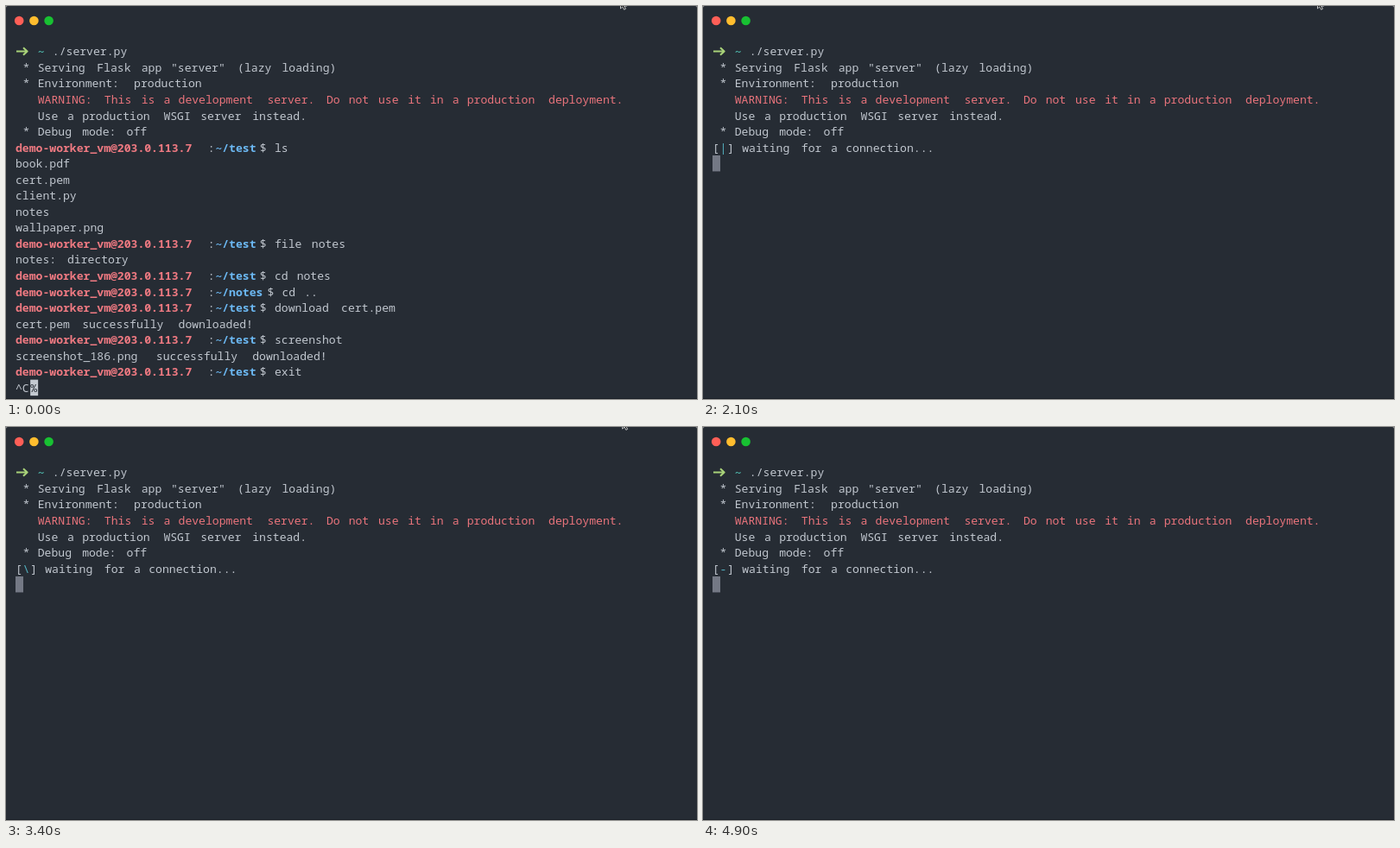
Write an HTML page that moves like this. It is 800 px wide and 455 px high and loops after 5 s.

```html
<!DOCTYPE html>
<html lang="en">
<head>
<meta charset="utf-8">
<title>Terminal session</title>
<style>
  html, body { margin: 0; width: 100%; height: 100%; overflow: hidden; background: #a9adb2; }
  svg { display: block; width: 800px; height: 455px; }
  text { font: 13.1px "Noto Sans Mono", monospace; fill: #c1c7cf; white-space: pre; }
  .warn { fill: #ea747c; }
  .host { fill: #f07a82; font-weight: 700; }
  .path { fill: #6cb9f4; font-weight: 700; }
  .home { fill: #4fb9ad; font-weight: 700; }
  .spin { fill: #55b5c4; }
  .dark { fill: #262c34; }
</style>
</head>
<body>
<svg viewBox="0 0 800 455">
  <rect width="800" height="460" rx="2" fill="#262c34"/>
  <rect y="454" width="800" height="1" fill="#1b2026"/>
  <circle cx="15.2" cy="17" r="5.3" fill="#ff5f57"/>
  <circle cx="32.4" cy="17" r="5.3" fill="#ffbd2e"/>
  <circle cx="49.6" cy="17" r="5.3" fill="#18c132"/>
  <path d="M12 52.5H24M20 48.3L24.6 52.5L20 56.7" fill="none" stroke="#a8d279" stroke-width="2.1" stroke-linejoin="round"/>
  <g id="screen"></g>
  <path id="pointer" d="M711.5 -8V3L713.8 .8L715.6 4.2L717.4 3.3L715.7 0H719Z" fill="#0b0d10" stroke="#eef0f2" stroke-width=".8"/>
</svg>
<script>
const LEFT = 11, TOP = 57.3, COL = 8.57, ROW = 18.55;
const HOST = "demo-worker_vm@203.0.113.7";
const COMMAND = "./server.py", WAITING = "waiting for a connection...";
const screen = document.getElementById("screen");
const pointer = document.getElementById("pointer");

// Words start on the column grid, but their letters are set tighter.
const put = (row, col, text, style = "") =>
  [...text.matchAll(/\S+/g)].map(word =>
    `<text class="${style}" x="${LEFT + (col + word.index) * COL}" y="${TOP + row * ROW}">${word[0]}</text>`
  ).join("");

const cursor = (row, col, fill = "#747985") =>
  `<rect x="${LEFT + col * COL}" y="${TOP - 14.2 + row * ROW}" width="9" height="18.5" fill="${fill}"/>`;

const prompt = (row, dir, command) => {
  const end = 27 + dir.length;
  return put(row, 0, HOST, "host") + put(row, 26, ":") +
    put(row, 27, dir, "path") + put(row, end, "$ " + command);
};

const shell = typed => put(0, 3, "~", "home") + put(0, 5, COMMAND.slice(0, typed));

const startup = () => shell(COMMAND.length) +
  put(1, 1, '* Serving Flask app "server" (lazy loading)') +
  put(2, 1, "* Environment: production") +
  put(3, 3, "WARNING: This is a development server. Do not use it in a production deployment.", "warn") +
  put(4, 3, "Use a production WSGI server instead.") +
  put(5, 1, "* Debug mode: off");

const session = () => startup() +
  prompt(6, "~/test", "ls") +
  ["book.pdf", "cert.pem", "client.py", "notes", "wallpaper.png"]
    .map((name, i) => put(7 + i, 0, name)).join("") +
  prompt(12, "~/test", "file notes") +
  put(13, 0, "notes: directory") +
  prompt(14, "~/test", "cd notes") +
  prompt(15, "~/notes", "cd ..") +
  prompt(16, "~/test", "download cert.pem") +
  put(17, 0, "cert.pem successfully downloaded!") +
  prompt(18, "~/test", "screenshot") +
  put(19, 0, "screenshot_186.png successfully downloaded!") +
  prompt(20, "~/test", "exit") +
  put(21, 0, "^C") + cursor(21, 2, "#c3c9d0") + put(21, 2, "%", "dark");

function typing(tick) {
  const typed = tick < 14 ? Math.max(0, tick - 8) : Math.max(5, tick - 9);
  return shell(typed) + cursor(0, 5 + typed);
}

function waiting(tick) {
  const n = tick - 21;
  const turn = n - (n > 3) - (n > 10);
  const raised = tick - 36;
  const label = [...WAITING].map((c, i) => i === raised ? c.toUpperCase() : c).join("");
  return startup() + put(6, 0, "[") + put(6, 1, "|/-\\"[turn % 4], "spin") +
    put(6, 2, "]") + put(6, 4, label) + cursor(7, 0);
}

let shown = -1;
function draw() {
  const tick = Math.floor(performance.now() % 5000 / 100);
  if (tick !== shown) {
    shown = tick;
    screen.innerHTML = tick < 1 ? session() : tick < 21 ? typing(tick) : waiting(tick);
    const drift = Math.max(0, tick - 32);
    pointer.setAttribute("transform", `translate(${drift * 1.1} ${-drift * .42})`);
    pointer.setAttribute("visibility", tick > 41 ? "hidden" : "visible");
  }
  requestAnimationFrame(draw);
}
draw();
</script>
</body>
</html>
```
